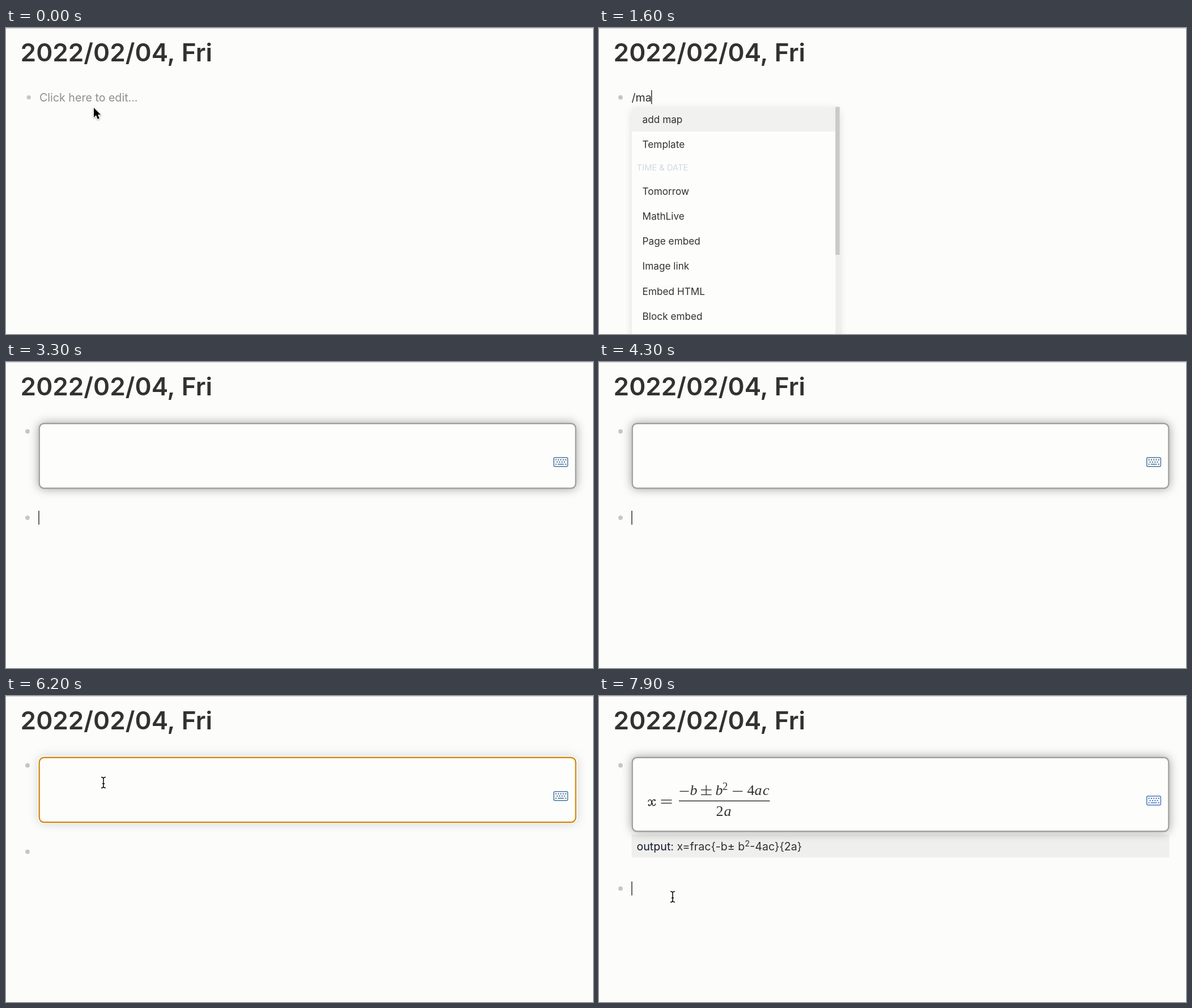
An HTML page with a canvas for the animation above (8 s loop, 1036x541 px).

```html
<!DOCTYPE html>
<html lang="en">
<head>
<meta charset="utf-8">
<title>Daily note</title>
<style>
html, body { margin: 0; width: 100%; height: 100%; overflow: hidden; background: #fcfcfb; }
canvas { display: block; width: 1036px; height: 541px; }
</style>
</head>
<body>
<canvas id="stage"></canvas>
<script>
const W = 1036, H = 541, LOOP = 8000, STEP = 100;
const canvas = document.getElementById('stage');
const ctx = canvas.getContext('2d');
const ratio = window.devicePixelRatio || 1;
canvas.width = W * ratio;
canvas.height = H * ratio;

const BG = '#fcfcfb', INK = '#31312d', BULLET = '#c6c7c0';
const SANS = 'Inter, sans-serif';
const SERIF = '"Liberation Serif", serif';
const BODY = '19.64px ' + SANS;
const ITEM = '17.2px ' + SANS;
const LABEL = '14.7px ' + SANS;

// Labels start with '#'
const FULL_MENU = {
  x: 65, thumb: 62.5, selected: 1,
  rows: ['#BASIC', 'Page reference', 'Page embed', 'Block reference', 'Block embed',
    'Link', 'Image link', 'Underline', 'Template', 'Todo']
};
const MATCH_MENU = {
  x: 57.7, thumb: 261.5, selected: 0,
  rows: ['add map', 'Template', '#TIME & DATE', 'Tomorrow', 'MathLive',
    'Page embed', 'Image link', 'Embed HTML', 'Block embed', 'Underline']
};
const MATH_MENU = { x: 57.7, thumb: 0, selected: 0, rows: ['MathLive'] };

// Pointer paths: [time, x, y]
const FIRST_PATH = [[0, 155, 141], [100, 155, 141], [400, 152, 124], [1000, 152, 124]];
const FIELD_PATH = [[5000, 2, 226], [5700, 172, 153], [6400, 172, 153]];
const LAST_PATH = [[7100, 172, 153], [7500, 132, 366], [7800, 130, 355], [8000, 130, 355]];

function rect(x, y, w, h, color) {
  ctx.fillStyle = color;
  ctx.fillRect(x, y, w, h);
}

function dot(x, y, r, color) {
  ctx.fillStyle = color;
  ctx.beginPath();
  ctx.arc(x, y, r, 0, Math.PI * 2);
  ctx.fill();
}

function roundRect(x, y, w, h, radii) {
  ctx.beginPath();
  ctx.roundRect(x, y, w, h, radii);
}

// Returns the x where the text ends
function text(str, x, y, font, color = INK) {
  ctx.font = font;
  ctx.fillStyle = color;
  ctx.fillText(str, x, y);
  return x + ctx.measureText(str).width;
}

function line(x1, y1, x2, y2, width, color = INK) {
  ctx.lineWidth = width;
  ctx.strokeStyle = color;
  ctx.beginPath();
  ctx.moveTo(x1, y1);
  ctx.lineTo(x2, y2);
  ctx.stroke();
}

function shadow(color, blur, y = 0) {
  ctx.shadowColor = color;
  ctx.shadowBlur = blur * ratio;
  ctx.shadowOffsetY = y * ratio;
}

function caret(x, y) {
  rect(x, y, 1.4, 24.5, '#22221f');
}

function blinkOn(t, start) {
  return (t - start) % 1000 < 500;
}

function page() {
  rect(0, 0, W, H, BG);
  rect(0, 0, W, 1, '#c9c7d3');
  text('2022/02/04, Fri', 25.6, 59, '600 44.2px ' + SANS, '#33322d');
}

function menu({ x, thumb, selected, rows }) {
  const top = 139.5, wide = 367, bar = 7.5;
  const tall = rows.length > 1 ? H + 40 - top : 44;
  ctx.save();
  shadow('rgba(0,0,0,0.13)', 14, 4);
  ctx.fillStyle = '#fdfdfc';
  roundRect(x, top, wide, tall, 7);
  ctx.fill();
  ctx.restore();

  let y = top;
  rows.forEach((row, i) => {
    if (row[0] === '#') {
      text(row.slice(1), x + 9, y + 24.5, LABEL, '#d0d9e3');
      y += 39.5;
      return;
    }
    if (i === selected) {
      ctx.fillStyle = '#f1f1f0';
      roundRect(x, y, wide - (thumb ? bar : 0), 43.5, i ? 3 : [7, 0, 0, 3]);
      ctx.fill();
    }
    text(row, x + 18.9, y + 28.2, ITEM);
    y += 44.05;
  });
  if (thumb) {
    rect(x + wide - bar, top, bar, H - top, '#eeeeed');
    rect(x + wide - bar, top, bar, thumb, '#cacac9');
  }
}

function spelling(x1, x2, y) {
  for (let x = x1 + 1.5; x < x2; x += 3.65) dot(x, y, 1.4, '#e8675a');
}

function codeLine(before, word, after, y) {
  const start = text(before, 57.5, y, BODY);
  const end = text(word, start, y, BODY);
  spelling(start, end, y + 2.3);
  return text(after, end, y, BODY);
}

function keyboard(y, color) {
  ctx.strokeStyle = color;
  ctx.lineWidth = 1.5;
  roundRect(966.8, y - 7.8, 24.6, 15.8, 2);
  ctx.stroke();
  const key = (x, row) => rect(x - 1, y + row * 3.9 - 1, 2.1, 2.1, color);
  for (let i = 0; i < 5; i++) key(970.6 + i * 4.3, -1);
  for (let i = 0; i < 4; i++) key(972.7 + i * 4.3, 0);
  key(970.6, 1);
  key(987.8, 1);
  rect(973.7, y + 3.1, 11, 1.6, color);
}

function field(tall, focused) {
  const x = 58.7, y = 108.7, w = 946.8, h = tall - 2.4;
  ctx.save();
  ctx.fillStyle = '#fdfdfc';
  shadow(focused ? 'rgba(70,80,100,0.28)' : 'rgba(0,0,0,0.36)', 17);
  roundRect(x - 1.2, y - 1.2, w + 2.4, h + 2.4, 10);
  ctx.fill();
  ctx.restore();
  if (focused) {
    ctx.lineWidth = 6;
    ctx.strokeStyle = '#fdfdfc';
    roundRect(x, y, w, h, 9);
    ctx.stroke();
  }
  ctx.lineWidth = 2.4;
  ctx.strokeStyle = focused ? '#d18c18' : '#9f9f9b';
  roundRect(x, y, w, h, 8.5);
  ctx.stroke();
  keyboard(107.5 + tall / 2 + 10.8, tall > 120 ? '#4b7abb' : '#4b749f');
}

function mathX() {
  ctx.save();
  ctx.lineCap = 'round';
  ctx.strokeStyle = INK;
  ctx.lineWidth = 1.3;
  ctx.stroke(new Path2D('M86.8 186.6C88 182.5 92 182 93 187L94 191C95 195 98.5 195 99.8 190.5'));
  ctx.stroke(new Path2D('M87.5 193C90 195.5 92 193 93 188.5C94 184 96.5 181.8 99.2 184'));
  line(92.7, 186, 94, 191, 2.1);
  dot(87.9, 192.6, 1.4, INK);
  dot(98.6, 184.4, 1.4, INK);
  ctx.restore();
}

function formula() {
  const italic = 'italic 26px ' + SERIF, roman = '26px ' + SERIF;
  mathX();
  line(109.5, 184, 128.5, 184, 1.4);
  line(109.5, 189.5, 128.5, 189.5, 1.4);
  line(141, 185.5, 301.5, 185.5, 1.3);
  line(142.5, 168.5, 158.5, 168.5, 1.4);
  text('b', 160.5, 175, italic);
  line(180, 166, 198.5, 166, 1.4);
  line(189.2, 157.5, 189.2, 174, 1.4);
  line(180, 174.5, 198.5, 174.5, 1.4);
  text('b', 205.5, 175, italic);
  text('2', 218, 165.5, '18.5px ' + SERIF);
  line(236, 168.5, 253.5, 168.5, 1.4);
  text('4', 261.5, 175, roman);
  text('a', 274.5, 175, italic);
  text('c', 289, 175, italic);
  text('2', 206.5, 212, roman);
  text('a', 220.5, 212, italic);
}

function output() {
  rect(57.5, 245, 949, 40.5, 'rgba(232,232,231,0.6)');
  let x = text('output', 66.5, 273, BODY, '#12182b');
  x = text(': x=frac{-b± b', x, 273, BODY);
  x = text('2', x, 266, LABEL);
  text('-4ac}{2a}', x, 273, BODY);
}

function along(path, t) {
  let i = 0;
  while (i < path.length - 2 && t >= path[i + 1][0]) i++;
  const [t0, x0, y0] = path[i], [t1, x1, y1] = path[i + 1];
  const k = Math.min(1, (t - t0) / (t1 - t0));
  const e = k * k * (3 - 2 * k);
  return [x0 + (x1 - x0) * e, y0 + (y1 - y0) * e];
}

function arrow(x, y) {
  ctx.save();
  ctx.translate(x, y);
  const shape = new Path2D('M0 0V17L4 13.3L6.8 20L9.8 18.8L7 12.3H12.2Z');
  ctx.lineJoin = 'round';
  ctx.lineWidth = 2.2;
  ctx.strokeStyle = '#fff';
  shadow('rgba(0,0,0,0.35)', 3, 1);
  ctx.stroke(shape);
  shadow('transparent', 0);
  ctx.fillStyle = '#000';
  ctx.fill(shape);
  ctx.restore();
}

function beam(x, y) {
  ctx.save();
  ctx.translate(x, y);
  const shape = new Path2D('M-4 -9.5Q0 -9.5 0 -6.5Q0 -9.5 4 -9.5M0 -7V7M-4 9.5Q0 9.5 0 6.5Q0 9.5 4 9.5M-2.2 2H2.2');
  ctx.lineWidth = 3.2;
  ctx.strokeStyle = 'rgba(255,255,255,0.8)';
  ctx.stroke(shape);
  ctx.lineWidth = 1.6;
  ctx.strokeStyle = '#111';
  ctx.stroke(shape);
  ctx.restore();
}

function pointer(path, t, overText) {
  const [x, y] = along(path, t);
  (overText(x, y) ? beam : arrow)(x, y);
}

function typing(t) {
  const editing = t >= 500;
  if (!editing) {
    dot(40.2, 122.7, 3.6, BULLET);
    text('Click here to edit...', 59, 130, BODY, '#8f908c');
  } else {
    dot(38, 122.7, 3.9, BULLET);
    const typed = t < 1000 ? '' : t < 1300 ? '/' : t < 1500 ? '/m' : t < 1700 ? '/ma' : '/math';
    const end = text(typed, 57.5, 130, BODY);
    if (typed) menu(t < 1300 ? FULL_MENU : t < 1700 ? MATCH_MENU : MATH_MENU);
    caret(Math.max(57.5, end - 0.7), 110);
  }
  if (t < 1000) pointer(FIRST_PATH, t, (x, y) => y < 135);
}

function code(t) {
  dot(38, 122.7, 3.9, BULLET);
  codeLine('[:div {:is "', 'mathlivesave-fnyzxltxm', '"}]', 130);
  const end = codeLine('{{renderer :', 'mathlivesave_fnyzxltxm', '}}', 159.4);
  if (t < 2100 || (t >= 2600 && t < 3100)) caret(end - 0.7, 139.5);
}

function mathBlock(t) {
  const filled = t >= 6500;
  const focused = t >= 5800 && t < 7500;
  const drop = filled ? 65 : 0;
  if (filled) output();
  field(filled ? 133 : 117, focused);
  if (filled) formula();
  dot(38, 122.7, 3.9, BULLET);
  dot(38, 275.3 + drop, 3.9, BULLET);
  if (!focused && blinkOn(t, t < 5800 ? 3300 : 7500)) caret(57.3, 263 + drop);

  const overText = (x, y) => x > 58 && (y < 107.5 + (filled ? 133 : 117) || y > 326);
  if (t >= 5000 && t < 6400) pointer(FIELD_PATH, t, overText);
  if (t >= 7100) pointer(LAST_PATH, t, overText);
}

function draw(now) {
  const t = Math.floor((now % LOOP) / STEP) * STEP;
  ctx.setTransform(ratio, 0, 0, ratio, 0, 0);
  page();
  if (t < 1800) typing(t);
  else if (t < 3300) code(t);
  else mathBlock(t);
}

let began = null;
function tick(now) {
  if (began === null) began = now;
  draw(now - began);
  requestAnimationFrame(tick);
}
draw(0);
requestAnimationFrame(tick);
</script>
</body>
</html>
```
